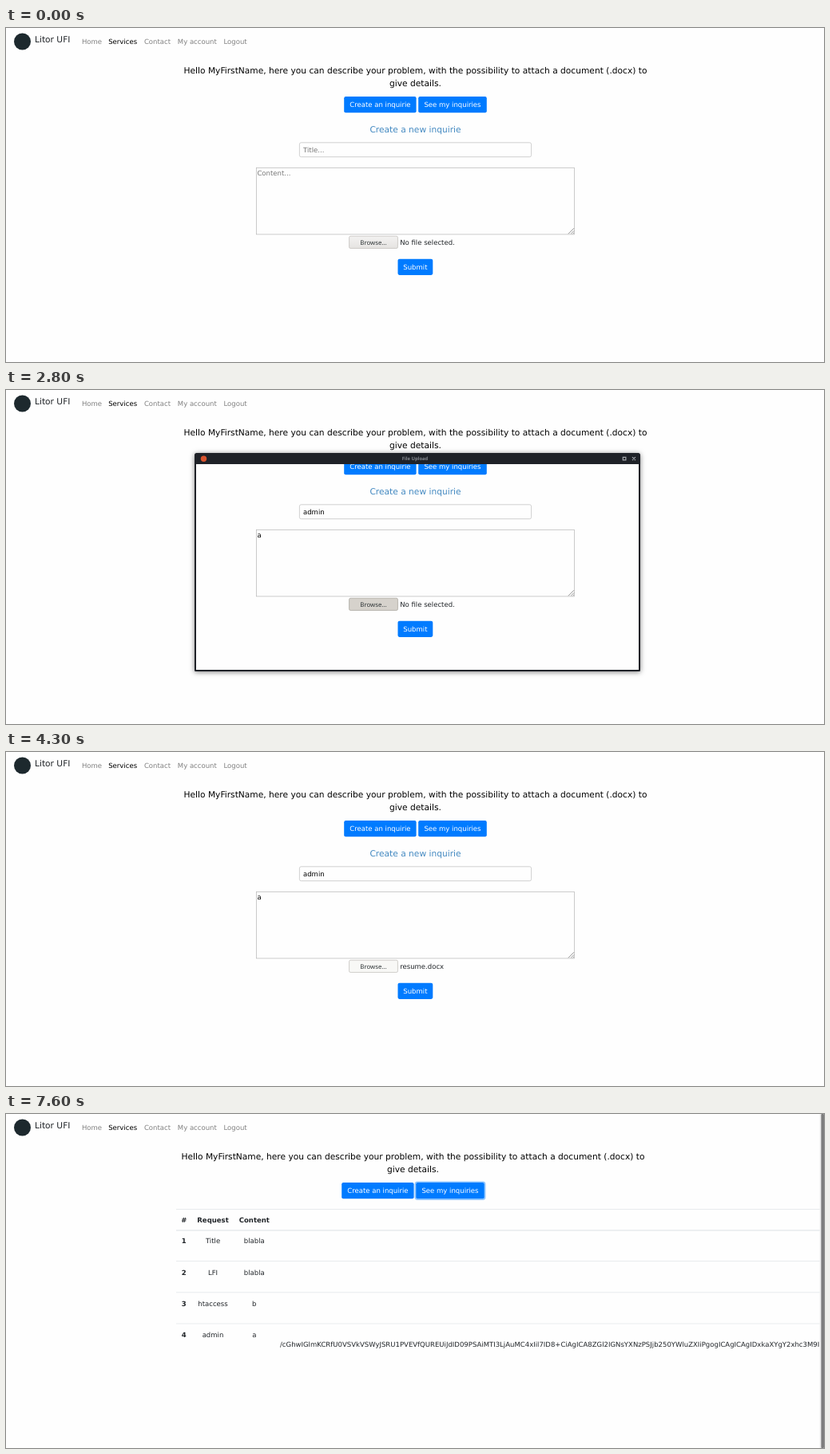
An HTML page that plays this animation: 1024x419 px, repeating every 8 s.

```html
<!DOCTYPE html>
<html lang="en">
<head>
<meta charset="utf-8">
<title>Inquiry form</title>
<style>
html, body { margin: 0; width: 100%; height: 100%; overflow: hidden; background: #fefefe; }
svg { position: absolute; left: 0; top: 0; display: block; }
text { font: 8.533px "DejaVu Sans", sans-serif; fill: #212529; text-rendering: geometricPrecision; white-space: pre; }
.big { font-size: 10.667px; }
.mid { text-anchor: middle; }
.bold { font-weight: bold; }
.ink { fill: #000; }
.link { fill: #808080; }
.hint { fill: #777; }
.white { fill: #fff; }
.btn { fill: #007bff; }
.ring { fill: none; stroke: #268fff; stroke-opacity: .5; stroke-width: 1.7; }
.field { fill: #fefefe; stroke: #c2c2c2; stroke-width: .75; }
.rule { stroke: #dee2e6; stroke-width: .7; }
#win {
  position: absolute; left: 236px; top: 79px; width: 558px; height: 273.5px; box-sizing: border-box;
  border: 2.5px solid #1f2228; border-top-width: 14.5px; border-radius: 2.5px 2.5px 1px 1px;
  box-shadow: 0 1px 6px rgba(0, 0, 0, .5);
}
#win svg { left: -2.5px; top: -14.5px; overflow: visible; }
#win text { font: 7.467px "Noto Sans", sans-serif; fill: #e9eaec; }
#win .bold { font-weight: bold; }
#win .mid { text-anchor: middle; }
#win .end { text-anchor: end; }
#win #caption { font-size: 5.87px; font-weight: bold; fill: inherit; }
.tool { fill: #2d323c; stroke: #181b20; stroke-width: .6; }
.icon { fill: #e2e4e8; }
.line { fill: none; stroke: #e2e4e8; stroke-width: 1.1; }
</style>
</head>
<body>
<svg id="page" width="1024" height="419" viewBox="0 0 1024 419">
  <defs>
    <linearGradient id="face" x2="0" y2="1">
      <stop stop-color="#f3f2f1"/><stop offset="1" stop-color="#e5e3e1"/>
    </linearGradient>
  </defs>
  <circle cx="20.5" cy="17" r="10.5" fill="#1d292e"/>
  <text class="big" x="36" y="18.3">Litor UFI</text>
  <text class="link" x="94.9" y="20.3">Home</text>
  <text class="ink" x="128.2" y="20.3">Services</text>
  <text class="link" x="172.9" y="20.3">Contact</text>
  <text class="link" x="214.8" y="20.3">My account</text>
  <text class="link" x="272.5" y="20.3">Logout</text>

  <g id="head">
    <text class="big mid ink" x="512.5" y="57.2">Hello MyFirstName, here you can describe your problem, with the possibility to attach a document (.docx) to</text>
    <text class="big mid ink" x="512.5" y="73.2">give details.</text>
    <rect class="btn" x="423.2" y="86.1" width="90.4" height="20.2" rx="2.1"/>
    <text class="mid white" x="468.4" y="99.3">Create an inquirie</text>
    <rect id="see" class="btn" x="516.2" y="86.1" width="85.6" height="20.2" rx="2.1"/>
    <rect id="seeRing" class="ring" x="515.4" y="85.3" width="87.2" height="21.8" rx="2.9"/>
    <text class="mid white" x="559" y="99.3">See my inquiries</text>
  </g>

  <g data-t="0 7000">
    <text class="big mid" x="512.5" y="130.8" style="fill:#4389c1">Create a new inquirie</text>
    <text class="big mid" x="512.5" y="155.6" style="fill:green" data-t="5900 7000">Your request has been forwarded to the HR department.</text>
    <g id="form">
      <rect id="title" class="field" x="367.4" y="143.8" width="290.2" height="17.9" rx="2.1"/>
      <text id="titleText" x="372" y="156.1"></text>
      <rect class="field" x="313.5" y="175.3" width="398" height="83.6" style="stroke:#b9b9b9"/>
      <path d="M704 258.2l7-7M707.2 258.2l3.8-3.8M709.6 258.2l1.4-1.4" fill="none" stroke="#666" stroke-width=".7"/>
      <text id="bodyText" x="314.4" y="185"></text>
      <rect id="caret" width=".8" height="10.6"/>
      <rect id="browse" x="429.6" y="261.2" width="60.8" height="15.2" rx="1.6" stroke-width=".7"/>
      <text class="mid" x="460" y="271.8" style="font:7.85px 'Noto Sans',sans-serif;fill:#2e3436">Browse…</text>
      <text id="file" x="493.2" y="272"></text>
      <rect id="submit" class="btn" x="490.5" y="289.7" width="43.8" height="20.2" rx="2.1"/>
      <rect id="submitRing" class="ring" x="489.7" y="288.9" width="45.4" height="21.8" rx="2.9"/>
      <text class="mid white" x="512.4" y="302.9">Submit</text>
    </g>
  </g>

  <g id="table" data-t="7000 8000">
    <path class="rule" d="M213 119.6H1019M213 184.6H1019M213 223.8H1019M213 263H1019"/>
    <path class="rule" d="M213 146H1019" style="stroke-width:1.1"/>
    <text x="343" y="292.4">/cGhwIGlmKCRfU0VSVkVSWyJSRU1PVEVfQUREUiJdID09PSAiMTI3LjAuMC4xIil7ID8+CiAgICA8ZGl2IGNsYXNzPSJjb250YWluZXIiPgogICAgICAgIDxkaXYgY2xhc3M9In</text>
    <rect x="1018.6" width="5.4" height="419" fill="#ededed"/>
    <rect x="1020.4" width="3.6" height="419" rx="1" fill="#7d7d7d"/>
  </g>
</svg>

<div id="win" data-t="2500 4300">
  <svg width="558" height="273.5" viewBox="236 79 558 273.5">
    <circle cx="247.5" cy="86.2" r="3.7" fill="#d9542f"/>
    <g id="chrome">
      <text id="caption" class="mid" x="512" y="88.3">File Upload</text>
      <path d="M772.3 84.3h3.6v3.6h-3.6zM784 84.2l4 4M788 84.2l-4 4" fill="none" stroke="currentColor" stroke-width="1.2"/>
    </g>
    <g id="content" data-t="2900 4300">
      <rect x="238" y="93" width="554.5" height="258" fill="#22252b"/>
      <rect x="238.5" y="93.5" width="22" height="211" fill="#191c21"/>
      <rect x="351" y="93.5" width="441" height="22.5" fill="#20232a"/>
      <rect x="351" y="116" width="441" height="14" fill="#22262e"/>
      <rect x="351" y="130" width="441" height="174.3" fill="#272b34"/>
      <path d="M351 93.5V304.3M238.5 304.3H792M351 116H792M351 130H792M680.5 116.5v13M713.5 116.5v13M757.5 116.5v13" stroke="#171a1f" stroke-width=".6"/>
      <rect id="pick" x="351.3" width="440.7" height="13.4" fill="#2777ff"/>

      <rect class="tool" x="355.3" y="97" width="110" height="15.3" rx="1.6"/>
      <rect x="423" y="97" width="29.5" height="15.3" fill="#181b20"/>
      <path d="M367.3 97v15.3M423 97v15.3M452.5 97v15.3" stroke="#181b20" stroke-width=".6"/>
      <path class="icon" d="M362.7 102v5.2l-2.8-2.6zM458 102v5.2l2.8-2.6z"/>
      <path class="icon" d="M373.2 105l4.5-4.4 4.5 4.4h-1.2v3.4h-2.2v-2.4h-2.2v2.4h-2.2V105z"/>
      <text x="383.8" y="107.3">wanderer</text>
      <text class="mid" x="437.8" y="107.3">docx</text>

      <text class="bold" x="354.4" y="125.5">Nom</text>
      <text class="bold" x="683.2" y="125.5">Taille</text>
      <text class="bold" x="717" y="125.5">Type</text>
      <text class="bold" x="761.8" y="125.5">Modifié</text>
      <path class="icon" d="M669.2 121.6h5.6l-2.8 3z"/>

      <circle class="line" cx="250.3" cy="103.6" r="3.3"/>
      <path class="line" d="M250.3 101.6v2.2h1.6" style="stroke-width:.8"/>
      <path class="icon" d="M246 121l4.3-4.2 4.3 4.2h-1.2v3.4h-2.1V122h-2v2.4h-2.1V121z"/>
      <path class="icon" fill-rule="evenodd" d="M246.5 134.8h7.6v6h-7.6zM251 138.4v1.4h2v-1.4z"/>
      <path class="icon" d="M247.6 151.2h3.6l2.2 2.2v5.2h-5.8z"/>
      <path class="icon" fill-rule="evenodd" d="M246.5 169h7.6v6.2h-7.6zM247.6 174h5.4l-1.7-2.8-1.4 1.6-.8-.8z"/>
      <path class="icon" d="M248.6 185.6l5-1v6.2a1.4 1.2 0 1 1-.9-1.1v-3.2l-3.2.7v5a1.5 1.2 0 1 1-.9-1.1z"/>
      <path class="icon" d="M249.4 202h1.8v3.2h2l-2.9 3-2.9-3h2zM246.8 209h7v1.2h-7z"/>
      <path class="icon" d="M246.4 220.8h5.4v1.7l2.6-1.6v5l-2.6-1.6v1.7h-5.4z"/>
      <path class="line" d="M246.7 245.2h7.2M250.3 241.6v7.2"/>

      <rect class="tool" x="742.3" y="308.6" width="46" height="15.4" rx="1.6"/>
      <text x="747" y="318.9">*.docx</text>
      <path class="icon" d="M777.6 315h6l-3 3.2z"/>
      <rect class="tool" x="658.8" y="331.3" width="63" height="15.5" rx="1.6"/>
      <circle class="line" cx="676" cy="339" r="3.6"/>
      <circle class="icon" cx="676" cy="339" r="2.2"/>
      <text x="683.4" y="341.9">Annuler</text>
      <rect id="open" class="tool" x="725.3" y="331.3" width="63.5" height="15.5" rx="1.6"/>
      <path class="icon" d="M744 340.4h1.8v-2.2h2.2l-3.1-3.3-3.1 3.3h2.2zM740.8 340v3h8.2v-3h-1.4v1.4h-5.4V340z"/>
      <text x="752.2" y="341.9">Ouvrir</text>
    </g>
  </svg>
</div>

<script>
const LOOP = 8000;
const el = id => document.getElementById(id);
const ramp = (t, a, b) => Math.min(1, Math.max(0, (t - a) / (b - a)));
const within = (t, a, b) => t >= a && t < b;

function add(parent, tag, attrs, text = '') {
  const node = document.createElementNS(parent.namespaceURI, tag);
  for (const key in attrs) node.setAttribute(key, attrs[key]);
  node.textContent = text;
  parent.append(node);
}
const label = (parent, x, y, text, cls = '') => add(parent, 'text', { x, y, class: cls }, text);

// Sidebar places and file rows
['Récents', 'Dossier personnel', 'Bureau', 'Documents', 'Images', 'Musique', 'Téléchargements', 'Vidéos']
  .forEach((name, i) => label(el('content'), 265.3, 106.3 + i * 17.1, name));
label(el('content'), 265.3, 247.9, 'Autres emplacements');

const rowY = i => 136.6 + i * 13.37;
['customXml', 'docProps', '_rels', 'word', 'resume.docx'].forEach((name, i) => {
  const box = el('content'), y = rowY(i), isFile = i === 4;
  label(box, 368.2, y + 2.6, name);
  label(box, 762.3, y + 2.6, isFile ? '15:51' : '15:37');
  const d = isFile ? `M357.6 ${y - 3.4}h3.4l1.6 1.6v5.2h-5z` : `M356 ${y - 3}h3l1 1h3.6v5h-7.6z`;
  add(box, 'path', { d, fill: isFile ? '#a9cdfb' : '#2b83f2' });
  if (isFile) {
    add(box, 'circle', { cx: 360.1, cy: y + .4, r: 1.4, fill: '#2777ff' });
    label(box, 709.8, y + 2.6, '36,7 ko', 'end');
    label(box, 718, y + 2.6, 'Document');
  }
});

// Inquiry table
[['#', 'Request', 'Content'], ['1', 'Title', 'blabla'], ['2', 'LFI', 'blabla'], ['3', 'htaccess', 'b'], ['4', 'admin', 'a']]
  .forEach((cells, r) => cells.forEach((cell, c) => {
    const y = r ? 162.4 + (r - 1) * 39.1 : 135.8;
    label(el('table'), [222.8, 259, 310.8][c], y, cell, r && c ? 'mid' : 'mid bold');
  }));

const timed = [...document.querySelectorAll('[data-t]')]
  .map(node => [node, ...node.dataset.t.split(' ').map(Number)]);

function setText(node, value, hint) {
  node.textContent = value || hint;
  node.setAttribute('class', value ? 'ink' : 'hint');
  return value ? node.getComputedTextLength() : 0;
}

function paintButton(id, hover, ring) {
  el(id).style.fill = `color-mix(in srgb, #0069d9 ${hover * 100}%, #007bff)`;
  el(id + 'Ring').style.opacity = ring;
}

function draw(t) {
  for (const [node, from, to] of timed) node.style.display = within(t, from, to) ? '' : 'none';
  const sent = t >= 5900;
  el('head').setAttribute('transform', `translate(${t >= 7000 ? -3 : 0} 0)`);
  el('form').setAttribute('transform', `translate(0 ${sent ? 24.5 : 0})`);

  const typed = t < 600 || sent ? '' : ['a', 'ad', 'adm', 'admin'][Math.min(3, Math.floor((t - 600) / 100))];
  const titleW = setText(el('titleText'), typed, 'Title...');
  const bodyW = setText(el('bodyText'), within(t, 2200, 5900) ? 'a' : '', 'Content...');

  const focus = t < 100 ? 0 : 1 - ramp(t, 1000, 1300);
  el('title').style.stroke = `color-mix(in srgb, #80bdff ${focus * 100}%, #c2c2c2)`;
  const inTitle = t < 1100;
  const caret = el('caret');
  caret.setAttribute('x', inTitle ? 371.8 + titleW : 314.1 + bodyW);
  caret.setAttribute('y', inTitle ? 147.8 : 176.8);
  caret.style.display = within(t, 100, 2400) ? '' : 'none';

  const pressed = within(t, 2400, 4300), hover = within(t, 4300, 4700);
  el('browse').style.fill = pressed ? '#d6d2cc' : hover ? '#f8f8f6' : 'url(#face)';
  el('browse').style.stroke = pressed ? '#a39e97' : '#bdbab6';
  el('file').textContent = within(t, 4300, 5900) ? 'resume.docx' : 'No file selected.';
  paintButton('submit', sent ? 0 : ramp(t, 4600, 4900), sent ? 0 : ramp(t, 4900, 5100));
  paintButton('see', ramp(t, 6700, 6900) - ramp(t, 7300, 7600), ramp(t, 6900, 7100));

  el('win').style.opacity = ramp(t, 2400, 2700);
  const active = t >= 3000;
  el('chrome').style.cssText = active ? 'fill:#fff;color:#fff' : 'fill:#858990;color:#a5a8ad';
  el('pick').setAttribute('y', rowY(t < 3900 ? 0 : 4) - 6.7);
  el('pick').style.opacity = t < 3100 ? 0 : 1;
  el('open').style.fill = t >= 4100 ? '#1c1f25' : t >= 4000 ? '#343a46' : '#2d323c';
}

const start = performance.now();
let last = -1;
function tick() {
  const t = Math.floor((performance.now() - start) % LOOP / 100) * 100;
  if (t !== last) draw(last = t);
  requestAnimationFrame(tick);
}
tick();
</script>
</body>
</html>
```
